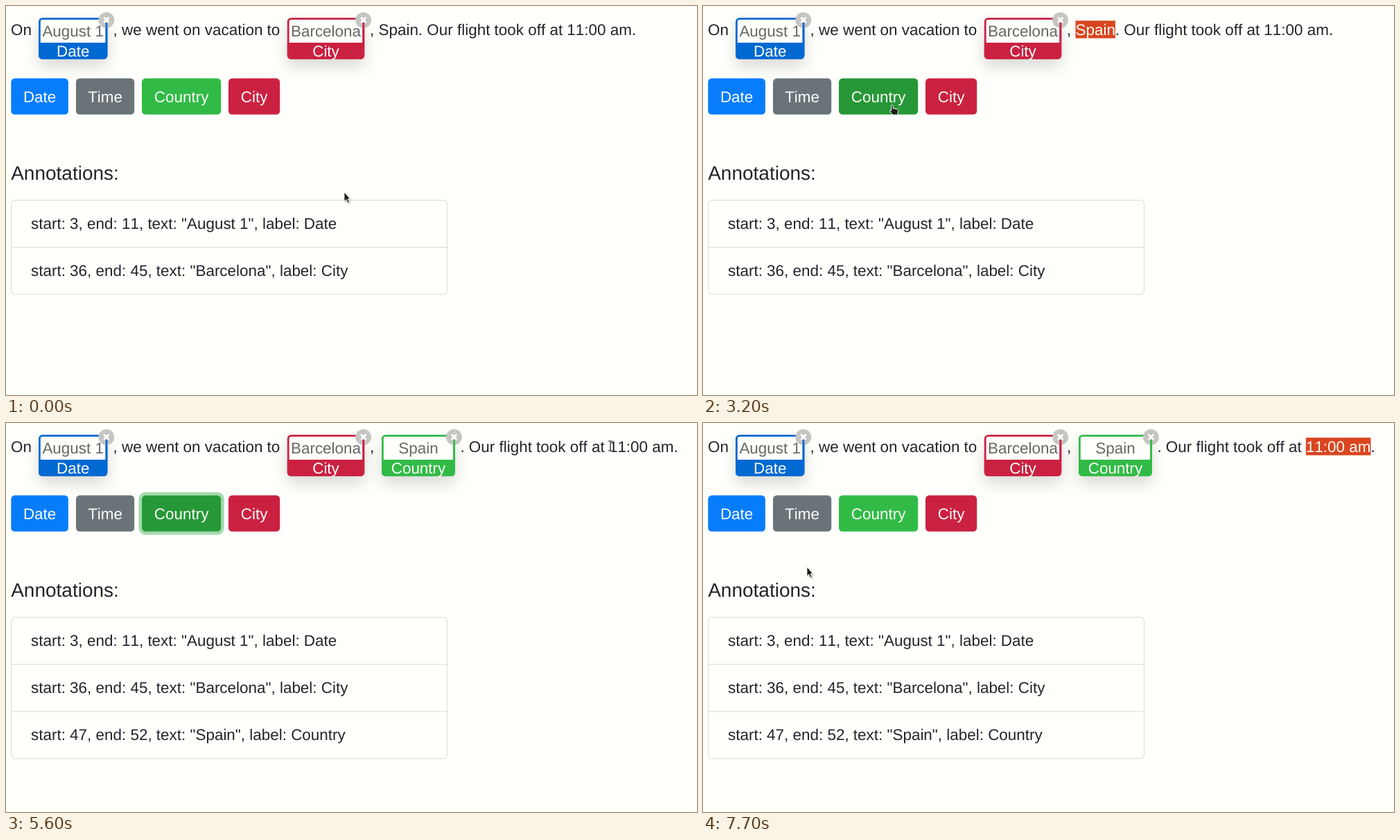
An HTML page for the animation above (8000 ms loop, 997 by 562 pixels).

```html
<!DOCTYPE html>
<html lang="en">
<head>
<meta charset="utf-8">
<title>Text annotation</title>
<style>
  html, body { margin: 0; width: 100%; height: 100%; overflow: hidden; background: #fffffc; }
  svg { display: block; width: 100vw; height: 100vh; }
  text {
    font: 22.45px "Liberation Sans", Arial, sans-serif;
    font-kerning: none; font-variant-ligatures: none;
    text-rendering: geometricPrecision; white-space: pre; fill: #212529;
  }
  .mid { text-anchor: middle; }
  .light { fill: #fffffc; }
  .faded { fill: #666663; }
  #title { font-size: 28px; }
</style>
</head>
<body>
<svg id="stage" viewBox="0 0 997 562">
  <defs>
    <filter id="soft" x="-50%" y="-80%" width="200%" height="290%">
      <feDropShadow dx="0" dy="11" stdDeviation="11" flood-color="#000" flood-opacity=".15"/>
    </filter>
    <filter id="tiny" x="-50%" y="-50%" width="220%" height="220%">
      <feDropShadow dx="1" dy="1.2" stdDeviation="1" flood-color="#000" flood-opacity=".35"/>
    </filter>
  </defs>
  <g id="page"></g>
  <g id="cursors">
    <path id="arrow" filter="url(#tiny)" d="M0 0V13.2L2.9 10.6L5.1 15.6L7.3 14.6L5.1 9.8H8.6Z"
      fill="#1b1b1b" stroke="#fff" stroke-width=".8"/>
    <g id="beam" fill="none">
      <path d="M-3 -7H-1L0 -6L1 -7H3M0 -6V6M-3 7H-1L0 6L1 7H3" stroke="#fff" stroke-width="2.8"/>
      <path d="M-3 -7H-1L0 -6L1 -7H3M0 -6V6M-3 7H-1L0 6L1 7H3" stroke="#222" stroke-width="1.2"/>
    </g>
    <path id="hand" d="M-1.3 .8Q0 -.8 1.3 .8V5L7.6 6.2Q9 6.8 8.8 8.4L7.6 14.2H.8L-3.6 9.2Q-3.6 7.4 -1.3 8.4Z"
      fill="#1b1b1b" stroke="#fff" stroke-width="1"/>
  </g>
</svg>
<script>
const NS = "http://www.w3.org/2000/svg";
const $ = id => document.getElementById(id);
const page = $("page");
const LOOP = 8000, STEP = 100;
const BLUE = "#0069d2", RED = "#cb2141", GREEN = "#31bb46", DARK_GREEN = "#269837";
const PRESS = 3300, COMMIT = 3400, DRAG = 5700;

function add(parent, tag, attrs = {}, text) {
  const el = document.createElementNS(NS, tag);
  for (const k in attrs) el.setAttribute(k, attrs[k]);
  if (text !== undefined) el.textContent = text;
  parent.appendChild(el);
  return el;
}
const label = (parent, x, y, text, cls = "") => add(parent, "text", { x, y, class: cls }, text);
const show = (el, on) => el.setAttribute("visibility", on ? "visible" : "hidden");

function token(x, w, text, name, color) {
  const g = add(page, "g"), right = x + w, mid = x + w / 2;
  add(g, "rect", { x: x + 1.4, y: 18.4, width: w - 2.8, height: 57, rx: 4.2,
    fill: "#fffffc", stroke: color, "stroke-width": 2.8, filter: "url(#soft)" });
  add(g, "path", { d: `M${x} 53H${right}V71.5a5.3 5.3 0 0 1 -5.3 5.3H${x + 5.3}a5.3 5.3 0 0 1 -5.3 -5.3Z`, fill: color });
  add(g, "circle", { cx: right - 1.6, cy: 20.4, r: 11.4, fill: "#c5c5c2" });
  add(g, "path", { d: `M${right - 1.4} 24V54`, stroke: color, "stroke-width": 2.8 });
  add(g, "path", { d: `M${right - 5.2} 16.6l7.4 7.4m0 -7.4l-7.4 7.4`, stroke: "#fff", "stroke-width": 2.8 });
  label(g, mid, 44.2, text, "mid faded");
  label(g, mid, 72.8, name, "mid light");
  return g;
}

function button(x, w, name, fill) {
  const rect = add(page, "rect", { x, y: 104.6, width: w, height: 52.2, rx: 5.4, fill });
  label(page, x + w / 2, 138.5, name, "mid light");
  return rect;
}

// A run of text whose first characters can be selected.
function selectable(parent, x, before, word, after) {
  const box = add(parent, "rect", { y: 21.2, height: 25.4, fill: "#d9461f" });
  const text = label(parent, x, 41.7, "");
  add(text, "tspan", {}, before);
  const picked = add(text, "tspan", { class: "light" });
  const rest = add(text, "tspan");
  add(text, "tspan", {}, after);
  const start = x + text.getSubStringLength(0, before.length);
  return n => {
    picked.textContent = word.slice(0, n);
    rest.textContent = word.slice(n);
    box.setAttribute("x", start);
    box.setAttribute("width", n ? picked.getComputedTextLength() : 0);
  };
}

// Sentence
label(page, 7, 41.7, "On");
token(47, 99.4, "August 1", "Date", BLUE);
label(page, 154.6, 41.7, ", we went on vacation to");
token(405.8, 111.4, "Barcelona", "City", RED);
const plain = add(page, "g"), tagged = add(page, "g");
const pickCountry = selectable(plain, 525, ", ", "Spain", ". Our flight took off at 11:00 am.");
label(tagged, 525, 41.7, ",");
const country = token(542, 106, "Spain", "Country", GREEN);
tagged.appendChild(country);
const pickTime = selectable(tagged, 655.4, ". Our flight took off at ", "11:00 am", ".");

// Buttons
const ring = add(page, "rect", { x: 193.7, y: 102.3, width: 118.8, height: 56.8, rx: 7.5,
  fill: "none", stroke: "#a4dbad", "stroke-width": 4.6 });
button(7.3, 82.6, "Date", "#087dfb");
button(101, 84.2, "Time", "#6a7478");
const countryBtn = button(196, 114.2, "Country", GREEN);
button(321, 74.2, "City", RED);

// Annotation list
label(page, 7.2, 250.7, "Annotations:").id = "title";
const frame = add(page, "rect", { x: 7.7, y: 280.6, width: 628.8, rx: 5.2,
  fill: "none", stroke: "#dfdfdc", "stroke-width": 1.2 });
const rows = [
  'start: 3, end: 11, text: "August 1", label: Date',
  'start: 36, end: 45, text: "Barcelona", label: City',
  'start: 47, end: 52, text: "Spain", label: Country'
].map((text, i) => {
  const g = add(page, "g"), y = 280.6 + i * 68.1;
  if (i) add(g, "path", { d: `M7.7 ${y}H636.5`, stroke: "#dfdfdc", "stroke-width": 1.2 });
  label(g, 36, y + 41.6, text);
  return g;
});

// Pointer moves: start, end, control point, target, easing
const inOut = u => u * u * (3 - 2 * u), out = u => u * (2 - u), even = u => u;
const moves = [
  [600, 1500, 410, 150, 540, 57, inOut],
  [1500, 1800, 554, 46, 549, 32, out],
  [2400, 2800, 556, 110, 350, 180, inOut],
  [3000, 3200, 310, 150, 273, 143, out],
  [3700, 4200, 300, 198, 344, 199, inOut],
  [4200, 4600, 520, 206, 738, 131, out],
  [4600, 5200, 822, 90, 868, 36, out],
  [5300, 5400, 872, 35, 876, 35, even],
  [5500, 5600, 874, 34, 872, 33, even],
  [5700, 6200, 900, 36, 934, 42, even],
  [6200, 6400, 940, 41, 946, 40, even],
  [6400, 6700, 949, 39, 952, 40, even],
  [6800, 7000, 954, 40, 957, 39, even],
  [7200, 7700, 520, 275, 150, 208, inOut]
];

function pointer(t) {
  let x = 488, y = 269;
  for (const [t0, t1, cx, cy, ex, ey, ease] of moves) {
    if (t <= t0) break;
    const u = ease(Math.min(1, (t - t0) / (t1 - t0))), v = 1 - u;
    x = v * v * x + 2 * u * v * cx + u * u * ex;
    y = v * v * y + 2 * u * v * cy + u * u * ey;
  }
  return { x, y };
}

// Right edge of each selectable character, in em
const advances = [.556, .556, .278, .556, .556, .278, .556, .833];
function charsBefore(x) {
  let edge = 869.9, n = 0;
  for (const a of advances) {
    if (x < edge + a * 11.2) break;
    edge += a * 22.45;
    n++;
  }
  return n;
}

function draw(t) {
  const { x, y } = pointer(t);
  const done = t >= COMMIT;
  const focus = t >= PRESS && t < DRAG;
  show(plain, !done);
  show(tagged, done);
  show(rows[2], done);
  frame.setAttribute("height", done ? 204.3 : 135.9);
  pickCountry(t >= 2200 ? 5 : 0);
  pickTime(t >= DRAG ? charsBefore(Math.min(t >= 7000 ? 957 : x, 957)) : 0);
  show(ring, focus);
  countryBtn.setAttribute("fill", t >= 3100 && t < DRAG ? DARK_GREEN : GREEN);

  const kind = y < 50 ? "beam" : y > 104 && y < 157 && x > 196 && x < 310 ? "hand" : "arrow";
  for (const id of ["arrow", "beam", "hand"]) show($(id), id === kind);
  $("cursors").setAttribute("transform", `translate(${x.toFixed(1)} ${y.toFixed(1)})`);
}

const begin = performance.now();
function tick() {
  const t = (performance.now() - begin) % LOOP;
  draw(Math.floor(t / STEP) * STEP);
  requestAnimationFrame(tick);
}
tick();
</script>
</body>
</html>
```
